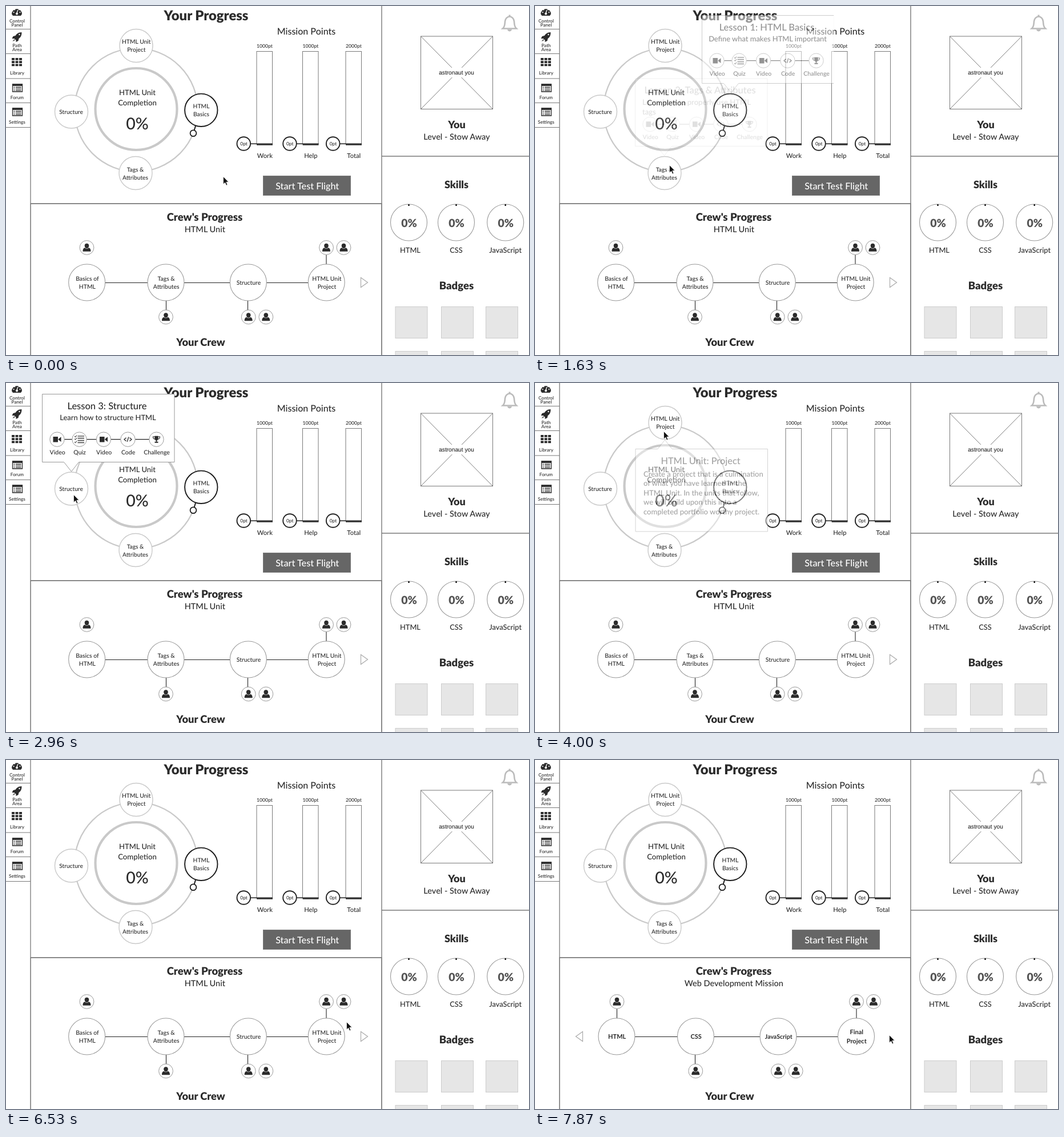
Animation, 916 px wide and 611 px high, one loop 8 s. Source, as an HTML page:

```html
<!DOCTYPE html>
<html lang="en">
<head>
<meta charset="utf-8">
<title>Progress dashboard</title>
<style>
html, body { margin: 0; width: 100%; height: 100%; overflow: hidden; background: #fff; }
svg { display: block; width: 916px; height: 611px; font-family: Lato, "Open Sans", sans-serif; fill: #2b2b2b; text-rendering: geometricPrecision; }
</style>
</head>
<body>
<svg id="stage" viewBox="0 0 916 611"></svg>
<script>
const LOOP = 8000, STEPS = 54;

// Drawing helpers; text y is the middle of the capitals.
const text = (x, y, size, s, o = {}) =>
  `<text x="${x}" y="${y + size * 0.36}" font-size="${size}" font-weight="${o.w || 500}" text-anchor="${o.a || 'middle'}" fill="${o.c || '#2b2b2b'}"${o.f ? ` font-family="${o.f}"` : ''}>${s}</text>`;
const lines = (x, y, gap, size, list, o) => list.map((s, i) => text(x, y + i * gap, size, s, o)).join('');
const path = (d, c = '#797979', w = 1, fill = 'none') =>
  `<path d="${d}" stroke="${c}" stroke-width="${w}" fill="${fill}"/>`;
const circle = (x, y, r, c = '#999', w = 1.1, fill = '#fff') =>
  `<circle cx="${x}" cy="${y}" r="${r}" stroke="${c}" stroke-width="${w}" fill="${fill}"/>`;
const box = (x, y, w, h, c = '#797979', fill = '#fff') =>
  `<rect x="${x}" y="${y}" width="${w}" height="${h}" stroke="${c}" fill="${fill}"/>`;
const at = (x, y, s, attr = '') => `<g transform="translate(${x} ${y})" ${attr}>${s}</g>`;
const solid = (d, c = '#2b2b2b') => path(d, 'none', 0, c);
const black = { w: 900 }, bold = { w: 700 };

function sidebar() {
  const gauge = solid('M-9 5A9 9 0 1 1 9 5L7 8H-7Z') +
    [[-5.5, 2], [-3.8, -2.6], [0, -4.8], [3.8, -2.6], [5.5, 2]].map(([x, y]) => circle(x, y, 1.1, 'none', 0)).join('') +
    path('M0 4L1.5-2', '#fff', 1.3) + circle(0, 4.4, 2, 'none', 0);
  const rocket = solid('M8-8C2-8-1-5-3-2L-7-1-9 3-5 3-2 6-2 9 2 7 3 3C6 1 8-2 8-8ZM-5 4L-8 8-4 6Z') + circle(4, -4, 1.2, 'none', 0);
  let grid = '';
  for (let i = 0; i < 9; i++) grid += box(-9 + i % 3 * 6.5, -7 + Math.floor(i / 3) * 5.2, 5, 3.8, 'none', '#2b2b2b');
  const list = path('M-8.5-6.5H8.5V6.5H-8.5Z', '#2b2b2b', 1.3) + solid('M-9-7H9V-3.5H-9Z') +
    [-1.2, 1.6, 4.4].map(y => path(`M-6.5 ${y}h2M-3 ${y}h9.5`, '#2b2b2b', 1.4)).join('');
  return at(19, 9, gauge) + at(19.5, 54, rocket) + at(19, 98, grid) + at(20, 143.5, list) + at(20, 185.5, list) +
    lines(19.5, 26, 7.3, 8.2, ['Control', 'Panel']) + lines(19.5, 69, 7.3, 8.2, ['Path', 'Area']) +
    text(19.5, 117, 8.2, 'Library') + text(19.5, 160, 8.2, 'Forum') + text(19.5, 203.5, 8.2, 'Settings') +
    path('M0 40.5H43M0 83.5H43M0 127H43M0 169.5H43M0 212.5H43') + path('M43 0V611', '#797979', 1.3);
}

function unitRing() {
  const g = '#c9c9c9';
  return circle(228, 182, 108, g, 2.2) + circle(228, 180.5, 71.5, g, 4.2) +
    text(230, 151, 13, 'HTML Unit') + text(230, 169.5, 13.2, 'Completion') + text(230, 206, 28.5, '0%') +
    circle(228, 69.5, 29, g, 1.4) + lines(228.3, 62, 14, 10.3, ['HTML Unit', 'Project']) +
    circle(114.5, 185, 29, g, 1.4) + text(114, 185, 10.2, 'Structure') +
    circle(227, 292.5, 29, g, 1.4) + lines(226.5, 286, 14, 10.2, ['Tags &amp;', 'Attributes']) +
    path('M332.5 208L329.5 218', '#1a1a1a', 1.8) + circle(328, 222.7, 5.4, '#1a1a1a', 1.8) +
    circle(341.8, 182.3, 28.7, '#1a1a1a', 1.9) + lines(342, 175.5, 14, 10.3, ['HTML', 'Basics']);
}

function points() {
  const bars = [[439, 416.3, '1000pt', 'Work'], [519.5, 497, '1000pt', 'Help'], [595, 572.7, '2000pt', 'Total']];
  return text(526, 44, 16, 'Mission Points') + bars.map(([x, cx, max, name]) =>
    box(x, 79.5, 27.5, 162) + path(`M${cx + 12} 241.2H${x + 28}`, '#222', 1.4) + path(`M${x} 242.5h28`, '#333', 2.6) +
    circle(cx, 241, 11.8, '#222', 1.9) + text(cx + 0.3, 241, 8.4, '0pt') +
    text(x + 14, 70, 8.6, max) + text(x + 14.3, 262, 11.2, name)).join('') +
    box(450.5, 297.5, 153, 34, '#797979', '#666') + text(527.7, 315, 16.2, 'Start Test Flight', { c: '#fff' });
}

function profile() {
  let s = box(726.5, 53, 126, 127.5) + path('M726.5 53L852.5 180.5M852.5 53L726.5 180.5') +
    '<rect x="755" y="108" width="68" height="17" fill="#fff"/>' +
    text(789, 116.5, 10.2, 'astronaut you', { w: 400, f: 'Liberation Sans, Arial, sans-serif', c: '#111' }) +
    text(789.5, 207.5, 18, 'You', black) + text(789.5, 228.5, 14.5, 'Level - Stow Away') +
    at(882, 30, path('M-12 9.5C-8 6-8.5 2-8-3C-7.5-8-4-11.5 0-11.5S7.5-8 8-3C8.5 2 8 6 12 9.5Z', '#bbb', 2.6) +
      path('M0-12V-14.5', '#bbb', 3) + solid('M-4 11H4C3 15.5-3 15.5-4 11Z', '#bbb')) +
    path('M658 263H916', '#797979', 1.5) + text(789, 312.5, 18, 'Skills', black) + text(789, 489.5, 18.5, 'Badges', black);
  for (const [x, labelX, name] of [[705.5, 708, 'HTML'], [788.5, 788.5, 'CSS'], [874.7, 874.7, 'JavaScript']])
    s += circle(x, 379, 32) + path(`M${x} 347v3`, '#111', 2.4) + text(x + 0.5, 380, 19.5, '0%', { w: 900, c: '#555' }) +
      text(labelX, 427, 12.8, name);
  for (const y of [526.5, 604.5]) for (const x of [682, 762.5, 840.5]) s += box(x, y, 56, 55, '#ccc', '#e6e6e6');
  return s;
}

const person = (x, y) => circle(x, y, 12.4, '#999', 1) +
  at(x, y, solid('M0-7.2C2.7-7.2 4-5.2 3.8-3C3.5-.6 2.2 1.2 0 1.2S-3.5-.6-3.8-3C-4-5.2-2.7-7.2 0-7.2ZM-7 6.8C-7 2-5.4.6-3.2.2C-1.4 2.2 1.4 2.2 3.2.2C5.4.6 7 2 7 6.8Z'));

function crew(unit, nodes, people, stems, arrow) {
  let s = box(43, 346, 615, 300) + text(348, 369.5, 18.5, "Crew's Progress", black) +
    text(348.3, 390.5, 14.5, unit) + text(341, 588, 18.3, 'Your Crew', black);
  s += path(`M${nodes[0][0]} 484.5H${nodes[3][0]}` + stems, '#222', 1.1);
  for (const [x, words, o, size = 10.4] of nodes) {
    const gap = o ? 15.5 : 14;
    s += circle(x, 484, 32, '#999', 1.1) + lines(x + 0.7, 484 - (words.length - 1) * gap / 2, gap, size, words, o);
  }
  return s + people.map(p => person(...p)).join('') + path(arrow, '#aaa', 1.2);
}

const icons = [
  solid('M-7-4.8H1.5V4.8H-7ZM2.2-.5L7-4.4V4.4L2.2.5Z'),
  path('M-3-5.7H8.5M-3-2H8.5M-3 2H8.5M-3 5.7H8.5', '#555', 1.7) + path('M-8.5-5.5L-7-4-4.5-7M-8.5-1L-7 .5-4.5-2.5M-8.5 4.5L-7 6-4.5 3', '#555', 1.1),
  '',
  path('M-3-3L-6.5 0-3 3M3-3L6.5 0 3 3M1.2-4.2L-1.2 4.2', '#2b2b2b', 1.3),
  solid('M-3.2-6H3.2V-2C3.2 0 2 1.5.8 2V4H3V6H-3V4H-.8V2C-2 1.5-3.2 0-3.2-2Z') + path('M-3-4.7H-6C-6-2-5-.5-2.5-.5M3-4.7H6C6-2 5-.5 2.5-.5', '#2b2b2b', 1.2)
];
icons[2] = icons[0];

// Lesson bubble with its corner at 0,0 and a tail pointing down.
function lesson(h, title, words, rowY) {
  const stops = [26, 65, 107.5, 150, 200], names = ['Video', 'Quiz', 'Video', 'Code', 'Challenge'];
  return path(`M0 0H231.5V${h}H64L51 ${h + 16.5} 38 ${h}H0Z`, '#999', 1, '#fff') + words + text(113.5, 20.5, 16.5, title) +
    path(`M26 ${rowY}H200`, '#222', 1.2) +
    stops.map((x, i) => circle(x, rowY, 12.7, '#999', 1) + at(x, rowY, icons[i]) + text(x + 0.6, rowY + 22.3, 10.5, names[i])).join('');
}

// fade: steps at which a bubble starts and ends its way in, then out
const popups = [
  { fade: [4, 8, 9, 13], art: at(292.5, 16.5, lesson(119, 'Lesson 1: HTML Basics',
      text(115, 41, 12.9, 'Define what makes HTML important'), 79.2), 'clip-path="url(#cut)"') },
  { fade: [10.5, 14, 16, 19.5], art: at(175.5, 127, lesson(118.5, 'Lesson 2: Tags &amp; Attributes',
      lines(12.5, 41.5, 17, 13.1, ['Learn how to properly use HTML', 'tags'], { a: 'start' }), 80)) },
  { fade: [16.5, 20, 23, 26], art: at(63.5, 19.5, lesson(119, 'Lesson 3: Structure',
      text(115, 41, 12.9, 'Learn how to structure HTML'), 79.2)) },
  { fade: [25.5, 29, 33, 36.5], art: path('M176 115.5H215L227.5 99.5 240 115.5H407.5V260H176Z', '#999', 1, '#fff') +
      text(290, 136, 16.3, 'HTML Unit: Project') +
      lines(190, 159, 16.6, 13, ['Create a project that is a culmination', 'of what you have learned in the',
        'HTML Unit. In the units that follow,', 'we will build upon this into a', 'completed portfolio worthy project.'], { a: 'start' }) }
];

const unitCrew = crew('HTML Unit',
  [[141.7, ['Basics of', 'HTML']], [280, ['Tags &amp;', 'Attributes']], [424.3, ['Structure']], [561.2, ['HTML Unit', 'Project']]],
  [[141.5, 423], [561, 423], [591.5, 423], [280, 544.5], [424.7, 544.5], [455.3, 544.5]],
  'M280.5 500V540M423.5 500V540M561 430V470', 'M621.5 475.5L633.5 484 621.5 492.5Z');
const missionCrew = crew('Web Development Mission',
  [[143, ['HTML'], bold, 11], [281.5, ['CSS'], bold, 11], [426, ['JavaScript'], bold, 10.6], [562.5, ['Final', 'Project'], bold, 11]],
  [[143.5, 423], [563, 423], [593, 423], [281.3, 544.5], [426, 544.5], [456.7, 544.5]],
  'M143.5 430V470M280.5 500V540M563 430V470', 'M83.5 475.5L71.5 484 83.5 492.5Z');

const stage = document.getElementById('stage');
stage.innerHTML = `<defs><clipPath id="cut"><path d="M-1-1H230.7V150H-1Z"/></clipPath>
  <clipPath id="panel"><path d="M42.5 345H658.5V611H42.5Z"/></clipPath></defs>` +
  `<g clip-path="url(#panel)"><g id="slide">${unitCrew}${at(615, 0, missionCrew)}</g></g>` +
  sidebar() + path('M43 346H658M658 0V611', '#797979', 1.4) +
  text(350.5, 16.5, 23.8, 'Your Progress', black) + unitRing() + points() + profile() +
  popups.map(p => `<g class="popup">${p.art}</g>`).join('') +
  `<g id="cursor">${path('M.4.4V14.2L3.6 11.2 5.8 16.2 8 15.2 5.9 10.3H10Z', '#fff', 0.9, '#111')}</g>`;

const slide = document.getElementById('slide');
const cursor = document.getElementById('cursor');
const bubbles = stage.querySelectorAll('.popup');

// Pointer path: step, x, y
const route = [
  [0, 380, 298], [1, 381, 311], [2, 376, 300], [4, 346, 204], [5, 340, 189], [8, 340, 189],
  [9, 325, 215], [11, 235, 278], [12, 225, 282], [14, 219, 280], [15, 201, 266], [16, 118, 195], [22, 118, 195],
  [24, 140, 150], [26, 225, 84], [32, 225, 84], [33, 290, 82], [34, 389, 114], [35, 405, 160],
  [37, 394, 260], [39, 381, 311], [40, 380, 315], [41, 450, 385], [42, 544, 448], [43, 544, 448],
  [44, 596, 458], [45, 611, 471], [46, 618, 479], [47, 620, 481], [54, 620, 481]
];
const clamp = v => Math.max(0, Math.min(1, v));

function pointer(k) {
  const i = route.findIndex(r => r[0] > k), a = route[i - 1], b = route[i];
  const u = (k - a[0]) / (b[0] - a[0]);
  return [a[1] + (b[1] - a[1]) * u, a[2] + (b[2] - a[2]) * u];
}

function draw(now) {
  // The picture advances in held steps; the offset absorbs rounding.
  const k = Math.min(STEPS - 1, Math.floor(now % LOOP / LOOP * STEPS + 0.08));
  cursor.setAttribute('transform', `translate(${pointer(k).join(' ')})`);
  popups.forEach(({ fade: [a, b, c, d] }, i) => {
    const o = Math.min(clamp((k - a) / (b - a)), clamp((d - k) / (d - c)));
    bubbles[i].setAttribute('opacity', o);
    bubbles[i].setAttribute('visibility', o ? 'visible' : 'hidden');
  });
  const p = clamp((k - 48.3) / 4);
  slide.setAttribute('transform', `translate(${-615 * (0.5 - Math.cos(p * Math.PI) / 2)} 0)`);
}

const start = performance.now();
function tick() {
  draw(performance.now() - start);
  requestAnimationFrame(tick);
}
tick();
</script>
</body>
</html>
```
